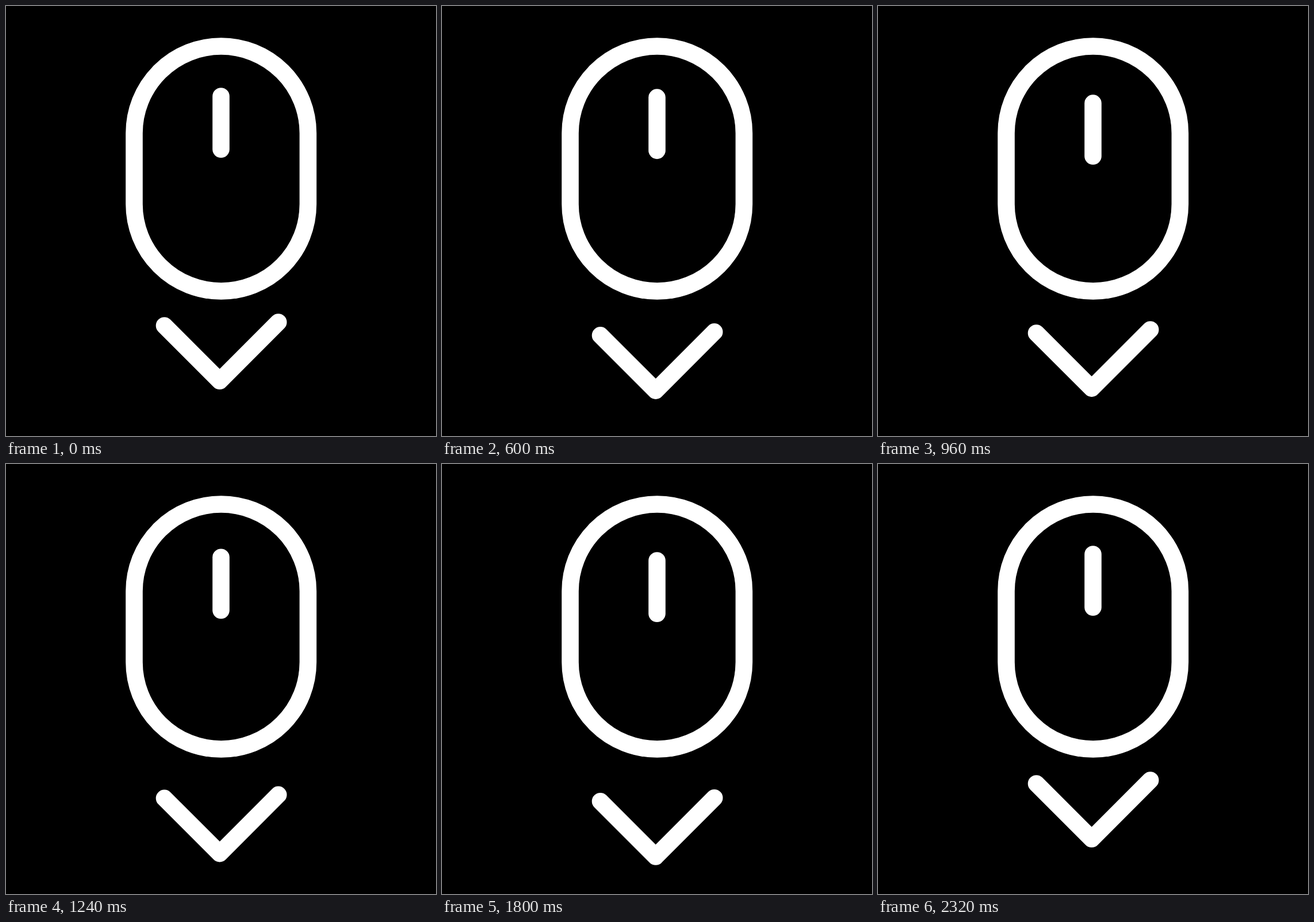
These frames come from a looping animation (748x748 px, 2.4 s). An HTML page:

```html
<!DOCTYPE html>
<html lang="en">
<head>
<meta charset="utf-8">
<title>Scroll down</title>
<style>
  html, body { margin: 0; width: 100%; height: 100%; overflow: hidden; background: #000; }
  svg { display: block; width: 100%; height: 100%; }
</style>
</head>
<body>
<svg viewBox="0 0 748 748" fill="none" stroke="#fff" stroke-width="29.6" stroke-linecap="round" stroke-linejoin="round">
  <rect x="223" y="70" width="302.4" height="426" rx="151.2"/>
  <path id="wheel" d="M374 157V249.2"/>
  <path id="arrow" d="M275.5 556L371.7 652.2L473.7 550"/>
</svg>
<script>
  const LOOP = 2400, STEP = 40, CYCLE = 733, CYCLES = 3;

  // Each part drops quickly, then eases back for the rest of its cycle.
  const parts = [
    { el: document.getElementById('wheel'), delay: 0, drop: 238, travel: 12.2 },
    { el: document.getElementById('arrow'), delay: 122, drop: 241, travel: 32 }
  ];

  const ease = s => s * s * (3 - 2 * s);

  function offset(t, { delay, drop, travel }) {
    const local = t - delay;
    if (local < 0 || local >= CYCLE * CYCLES) return 0;
    const p = local % CYCLE;
    return travel * ease(p < drop ? p / drop : (CYCLE - p) / (CYCLE - drop));
  }

  function draw() {
    const t = Math.floor((performance.now() % LOOP) / STEP) * STEP;
    for (const part of parts) {
      part.el.setAttribute('transform', `translate(0 ${offset(t, part).toFixed(2)})`);
    }
    requestAnimationFrame(draw);
  }
  draw();
</script>
</body>
</html>
```
